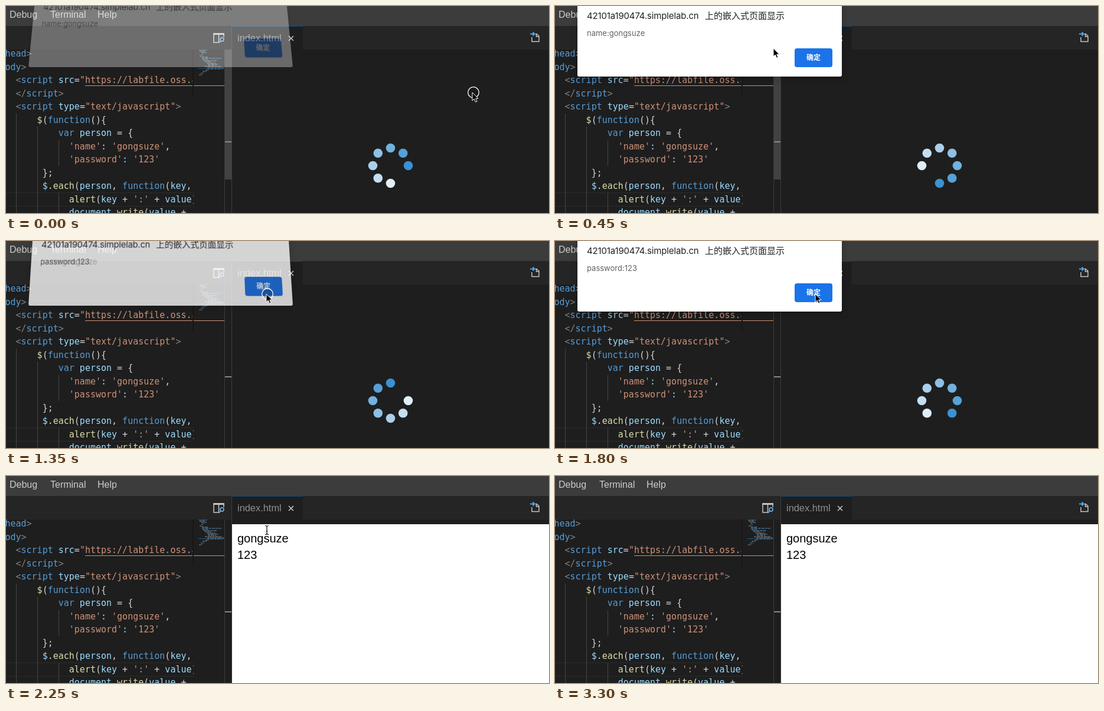
An HTML page that plays this animation: 920 by 352 pixels, repeating every 4.07 s.

```html
<!DOCTYPE html>
<html lang="zh">
<head>
<meta charset="utf-8">
<title>Editor preview</title>
<style>
html, body { margin: 0; width: 100%; height: 100%; overflow: hidden; background: #1e1e1e; }
#stage { position: relative; width: 920px; height: 352px; overflow: hidden; background: #1e1e1e; }
#stage > svg { position: absolute; left: 0; top: 0; }
.ui { font: 16px "Liberation Sans", Arial, sans-serif; fill: #ccc; }
.code text { font: 15px "DejaVu Sans Mono", monospace; white-space: pre; }
.g { fill: #808080; } .b { fill: #569cd6; } .a { fill: #9cdcfe; }
.s { fill: #ce9178; } .f { fill: #dcdcaa; } .w { fill: #d4d4d4; }
.page { font: 20px "Liberation Sans", Arial, sans-serif; fill: #000; }
#dialog {
  position: absolute; left: 38px; top: -20px; width: 448px; height: 140px;
  background: #fff; border-radius: 0 0 3px 3px; transform-origin: 50% 100%;
  box-shadow: 0 4px 14px rgba(0,0,0,.25);
  font-family: Inter, "Noto Sans CJK SC", "Noto Sans CJK", sans-serif; white-space: nowrap;
}
#dialog span { position: absolute; line-height: 20px; left: 16px; }
#dialog .title { top: 27px; font-size: 15px; letter-spacing: -.15px; color: #202124; }
#dialog .cjk { left: 216px; letter-spacing: 0; }
#dialog .msg { top: 56px; font-size: 13px; color: #5f6368; }
#old { opacity: .4; }
#ok {
  position: absolute; left: 368px; top: 92px; width: 64px; height: 32px; border-radius: 4px;
  color: #fff; font-size: 12px; font-weight: 700; line-height: 32px; text-align: center;
}
</style>
</head>
<body>
<div id="stage">
  <svg width="920" height="352">
    <rect width="920" height="34" fill="#3c3c3c"/>
    <rect y="34" width="920" height="40" fill="#252526"/>
    <rect x="383" y="34" width="120" height="40" fill="#1e1e1e"/>
    <rect x="383" y="34" width="120" height="1" fill="#0d4d7c"/>
    <g class="ui">
      <text x="6" y="20">Debug</text>
      <text x="75" y="20">Terminal</text>
      <text x="155" y="20">Help</text>
      <text x="392" y="60" font-size="16.4" style="font-size:16.4px;fill:#8f8f8f">index.html</text>
    </g>
    <path d="M479 51l8 8m0-8l-8 8" stroke="#ccc" stroke-width="1.5"/>
    <g fill="none" stroke="#c5c5c5" stroke-width="1.5">
      <path d="M360 62H352V47H369V53M360.500 49V62"/>
      <path d="M351.300 47.500H369.700" stroke-width="3"/>
      <g stroke="#75beff"><circle cx="366" cy="57" r="3"/><path d="M364 59.500L360.500 63"/></g>
      <path d="M891 53V60.500H903V51L899 47.500H897M898.500 47.500V52H903"/>
      <path d="M888 47.500H895M892.500 44.500L895.500 47.500L892.500 50.500" stroke="#4aa8f0" stroke-width="2"/>
    </g>
    <svg class="code" id="code" width="318" height="352"></svg>
    <path d="M134 135.500H370" stroke="#ce9178"/>
    <g id="map"></g>
    <rect x="316" y="74" width="2" height="79" fill="#161616"/>
    <rect id="slider" x="371" y="74" width="11" height="221" fill="#424242"/>
    <path d="M370.500 74V352M382.500 34V352" stroke="#3c3c3c"/>
    <rect x="371" y="230" width="11" height="2" fill="#8a8a8a"/>
    <g id="spinner"></g>
    <g id="page">
      <rect x="383" y="82" width="537" height="270" fill="#fff"/>
      <text class="page" x="392" y="113">gongsuze</text>
      <text class="page" x="392" y="141">123</text>
    </g>
  </svg>
  <div id="dialog">
    <span class="title">42101a190474.simplelab.cn</span>
    <span class="title cjk">上的嵌入式页面显示</span>
    <span class="msg" id="old">name:gongsuze</span>
    <span class="msg" id="msg"></span>
    <div id="ok">确定</div>
  </div>
  <svg width="920" height="352">
    <g id="cursor">
      <circle id="ring" cx="2" cy="0" r="9.300" fill="rgba(0,0,0,.15)" stroke="#fff" stroke-width="1.300"/>
      <path id="arrow" d="M0 0V14L3.200 11L5.600 16.300L8 15.300L5.700 10.200H10Z" fill="#000" stroke="#fff" stroke-linejoin="round"/>
      <path id="beam" d="M-3 -7.500Q0 -7.500 0 -5.500Q0 -7.500 3 -7.500M0 -6V6M-3 7.500Q0 7.500 0 5.500Q0 7.500 3 7.500M-1.500 2H1.500" fill="none" stroke="#111" stroke-width="1.200"/>
    </g>
  </svg>
</div>
<script>
const LOOP = 4070;
const $ = id => document.getElementById(id);

function add(parent, tag, attrs, text) {
  const el = document.createElementNS('http://www.w3.org/2000/svg', tag);
  for (const k in attrs) el.setAttribute(k, attrs[k]);
  if (text) el.textContent = text;
  parent.appendChild(el);
  return el;
}

// Code: column, then tokens whose first letter is the colour class.
const lines = [
  [-2, 'bhead', 'g>'],
  [-2, 'body', 'g>'],
  [0, 'g<', 'bscript ', 'asrc', 'w=', 's"https://labfile.oss.a'],
  [0, 'g</', 'bscript', 'g>'],
  [0, 'g<', 'bscript ', 'atype', 'w=', 's"text/javascript"', 'g>'],
  [4, 'f$', 'w(', 'bfunction', 'w(){'],
  [8, 'bvar ', 'aperson', 'w = {'],
  [10, "s'name'", 'a:', "s 'gongsuze'", 'w,'],
  [10, "s'password'", 'a:', "s '123'"],
  [5, 'w};'],
  [5, 'a$', 'w.', 'feach', 'w(', 'aperson', 'w, ', 'bfunction', 'w(', 'akey', 'w,'],
  [10, 'falert', 'w(', 'akey', 'w + ', "s':'", 'w + ', 'avalue', 'w)'],
  [10, 'adocument', 'w.', 'fwrite', 'w(', 'avalue', 'w + ', "s'<br>'"]
];
lines[1] = [-2, 'body', 'g>'].map((t, i) => i === 1 ? 'b' + 'ody' : t);

const code = $('code');
add(code, 'path', { d: 'M0 317.500H318M0 340.500H318', stroke: '#2b2b2b' });
add(code, 'path', { d: 'M17.500 183V352M53.500 205V352M89.500 228V272M89.500 318V352', stroke: '#454545' });
lines.forEach(([col, ...tokens], i) => {
  const text = add(code, 'text', { x: 16.5 + col * 9.03, y: 86 + i * 22.5 });
  for (const t of tokens) add(text, 'tspan', { class: t[0] }, t.slice(1));
});

// Minimap rows: y, x, width
[[75, 327, 14], [77, 328, 9], [79, 331, 9], [82, 331, 5], [85, 328, 6], [87, 332, 10],
 [89, 332, 33], [91, 333, 9], [93, 335, 22], [95, 337, 10], [97, 340, 15], [99, 342, 18],
 [101, 342, 14], [103, 337, 28], [105, 341, 28], [107, 341, 26], [109, 338, 6],
 [111, 333, 7], [114, 330, 6], [117, 327, 6]
].forEach(([y, x, w], i) => add($('map'), 'path', {
  d: `M${x} ${y}h${w}`, stroke: ['#3f6a8c', '#7a6053', '#4f7388'][i % 3],
  'stroke-width': 1.3, 'stroke-dasharray': '4 1 6 1'
}));
add($('map'), 'path', { d: 'M326 106.500H370', stroke: '#28567a' });

const dots = [...Array(8)].map((_, i) => {
  const a = i * Math.PI / 4;
  return add($('spinner'), 'circle', {
    cx: 651.5 + 30 * Math.sin(a), cy: 271.5 - 30 * Math.cos(a), r: 7.8
  });
});

// Each table row starts with its time.
const spin = [[0, 2], [300, 3], [450, 4], [600, 5], [900, 6], [1050, 7], [1200, 8],
  [1500, 9], [1650, 10], [1800, 11]];
const cursor = [
  [0, 790, 147, 'click'], [150, 788, 147, 'arrow'], [300, 547, 99, 'arrow'],
  [450, 370, 72, 'arrow'], [600, 377, 72, 'arrow'], [750, 437, 83, 'arrow'],
  [900, 441, 90, 'arrow'], [1350, 441, 90, 'click'], [1500, 441, 90, 'arrow'],
  [2100, 441, 90, 'click'], [2250, 442, 92, 'beam'], [2550, 512, 107, 'arrow'],
  [2700, 571, 107, 'arrow'], [2850, 776, 146, 'arrow'], [3150, 866, 341, 'arrow'],
  [3300, 0, 0, 'none']
];
// time, opacity, lift, tilt
const dialog = [[0, .33, 16, .00045], [150, 1, 0, 0], [1350, .78, 10, .00029],
  [1500, 1, 0, 0], [2100, .35, 11, .0003], [2250, 0, 0, 0]];

const at = (rows, t) => rows.filter(r => r[0] <= t).pop();
const show = (id, on) => { $(id).style.display = on ? '' : 'none'; };

function draw(t) {
  const head = at(spin, t)[1];
  dots.forEach((dot, i) => {
    const age = (head - i + 16) % 8, k = age / 6;
    dot.setAttribute('fill', age === 7 ? 'none' :
      `rgb(${58 + 166 * k},${146 + 92 * k},${210 + 38 * k})`);
  });

  const [, x, y, kind] = at(cursor, t);
  $('cursor').setAttribute('transform', `translate(${x} ${y})`);
  show('ring', kind === 'click');
  show('arrow', kind === 'click' || kind === 'arrow');
  show('beam', kind === 'beam');

  const [, opacity, lift, tilt] = at(dialog, t);
  const style = $('dialog').style;
  style.opacity = opacity;
  style.transform = tilt
    ? `translateY(${-lift}px) matrix3d(1,0,0,0, 0,1.036,0,${-tilt}, 0,0,1,0, 0,0,0,1)` : 'none';
  $('msg').textContent = t < 1350 ? 'name:gongsuze' : 'password:123';
  show('old', t >= 1350 && t < 1500);
  $('ok').style.background = t >= 600 && t < 1350 ? '#2379e9' : '#1a73e8';

  show('slider', t < 600);
  show('spinner', t < 2100);
  show('page', t >= 2100);
}

const start = performance.now();
function tick() {
  draw((performance.now() - start) % LOOP);
  requestAnimationFrame(tick);
}
draw(0);
requestAnimationFrame(tick);
</script>
</body>
</html>
```
